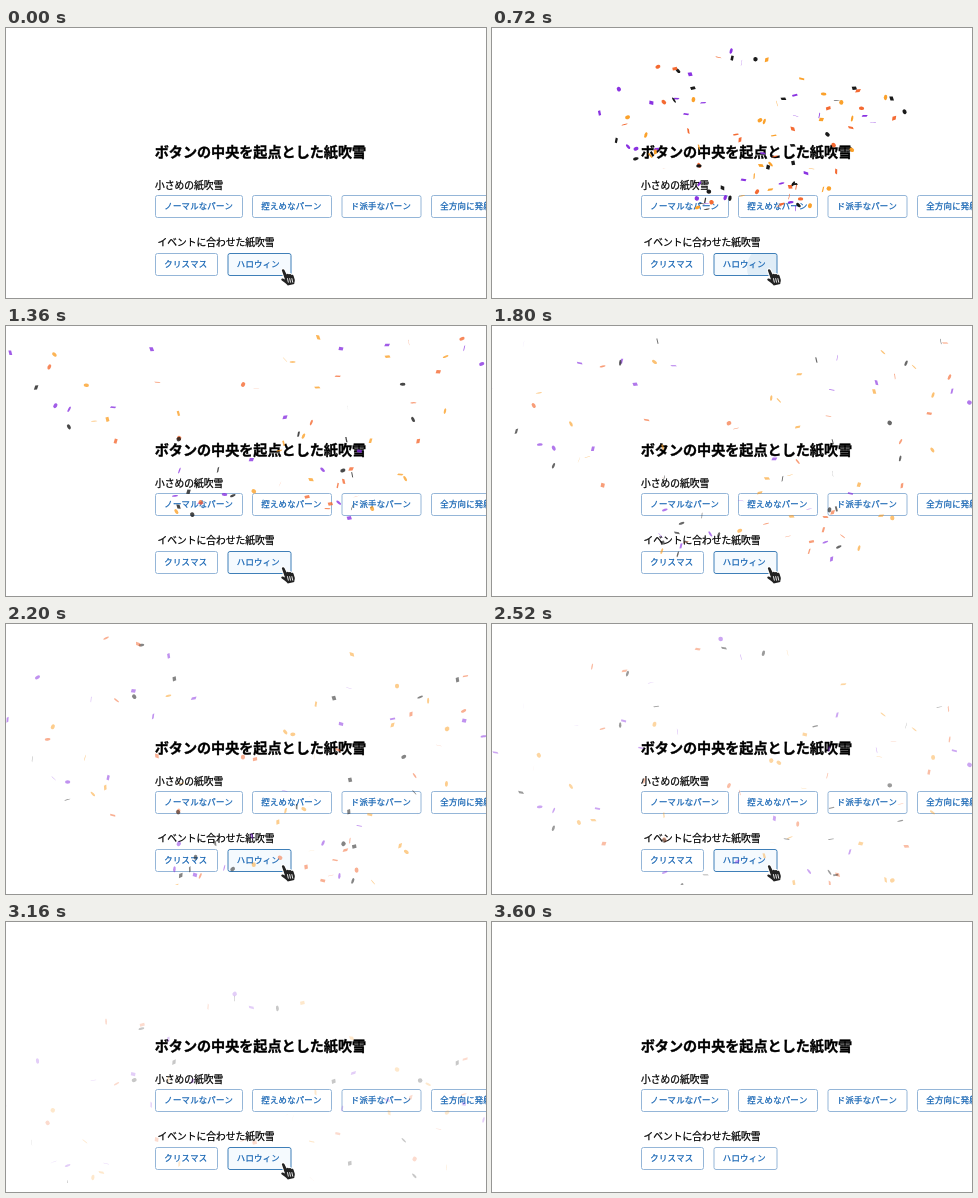
Animation of 480x270 px, one loop 4080 ms. Source, as an HTML page with a canvas:

```html
<!DOCTYPE html>
<html lang="ja">
<head>
<meta charset="utf-8">
<style>
  html, body { margin: 0; height: 100%; overflow: hidden; background: #fff; }
  canvas { display: block; }
</style>
</head>
<body>
<canvas id="stage" width="480" height="270"></canvas>
<script>
const ctx = document.getElementById('stage').getContext('2d');
const LOOP = 4080, STEP = 40, BURST = 560, END = 3600;
const FONT = '"Noto Sans CJK JP", "Noto Sans CJK", sans-serif';
const BLUE = '#1564b3';
const COLORS = ['#fb9d22', '#f4642a', '#852be0', '#111111'];

// Confetti physics per 60 Hz tick, in stage pixels.
const ORIGIN = { x: 253, y: 236 };
const COUNT = 110, SPEED = 27, SPREAD = Math.PI / 2;
const DECAY = 0.9, FALL = 1.5, LIFE = 200, DELAY = 27;

const random = (i, k) => {
  const v = Math.sin(i * 12.9898 + k * 78.233) * 43758.5453;
  return v - Math.floor(v);
};

const pieces = Array.from({ length: COUNT }, (_, i) => {
  const angle = (random(i, 6) - 0.5) * SPREAD;
  const reach = SPEED * (0.5 + random(i, 7)) / (1 - DECAY);
  return {
    seed: i,
    color: COLORS[i % COLORS.length],
    dx: reach * Math.sin(angle),
    dy: -reach * Math.cos(angle),
    round: random(i, 1) < 0.5,
    wobble: random(i, 2) * 10,
    wobbleSpeed: Math.min(0.11, random(i, 3) * 0.1 + 0.05),
    tilt: (random(i, 4) * 0.5 + 0.25) * Math.PI
  };
});

function drawPiece(p, n) {
  const reached = 1 - DECAY ** n;
  const x = ORIGIN.x + p.dx * reached, y = ORIGIN.y + p.dy * reached + FALL * n;
  const wobble = p.wobble + p.wobbleSpeed * n, tilt = p.tilt + 0.1 * n;
  const size = (2 + random(p.seed, n + 8)) / 2;
  const tx = size * Math.cos(tilt), ty = size * Math.sin(tilt);
  const wx = 5.3 * Math.cos(wobble), wy = 5.3 * Math.sin(wobble);
  ctx.fillStyle = p.color;
  ctx.beginPath();
  if (p.round) {
    ctx.ellipse(x, y, Math.abs(wx) * 0.6, Math.abs(wy) * 0.6, Math.PI / 10 * wobble, 0, 7);
  } else {
    ctx.moveTo(x, y);
    ctx.lineTo(x + wx, y + ty);
    ctx.lineTo(x + wx + tx, y + wy + ty);
    ctx.lineTo(x + tx, y + wy);
  }
  ctx.fill();
}

function drawConfetti(age) {
  const n = Math.round((age - DELAY) * 0.06);
  if (n <= 0) return;
  ctx.save();
  ctx.beginPath();
  ctx.rect(0, 9, 480, 252);
  ctx.clip();
  ctx.globalAlpha = Math.max(0, 1 - n / LIFE);
  pieces.forEach(p => drawPiece(p, n));
  ctx.restore();
}

// A thin stroke gives the glyphs a medium weight.
function text(str, x, y, size, { weight = 400, color = '#000', spacing = 0, bolden = 0.25 } = {}) {
  ctx.font = `${weight} ${size}px ${FONT}`;
  ctx.letterSpacing = spacing + 'px';
  ctx.fillStyle = ctx.strokeStyle = color;
  ctx.lineWidth = bolden;
  ctx.fillText(str, x, y);
  ctx.strokeText(str, x, y);
}

function button(label, x, y, w, hover, age = -1) {
  ctx.beginPath();
  ctx.roundRect(x + 0.5, y + 0.5, w - 1, 22, 2);
  ctx.fillStyle = hover ? '#f5fafe' : '#fff';
  ctx.fill();
  if (age >= 0 && age < 550) {
    const ripple = new Path2D();
    ripple.arc(279, 240, age * 0.15, 0, 7);
    ctx.save();
    ctx.clip();
    ctx.globalAlpha = 0.09 * Math.min(1, (550 - age) / 250);
    ctx.fillStyle = BLUE;
    ctx.fill(ripple);
    ctx.restore();
  }
  ctx.strokeStyle = hover ? '#3f7fb8' : '#95b6d8';
  ctx.lineWidth = 1;
  ctx.stroke();
  text(label, x + 9.3, y + 14.2, 8.4, { color: BLUE, spacing: 0.24 });
}

const hand = new Path2D('M0.3 1.6C0 0.2 2 -0.5 2.8 0.9L5 5.4C5.6 4.4 7 4.7 7.4 5.6' +
  'C8.2 4.7 9.4 5.1 9.8 6C10.8 5.4 11.8 6 12.1 7.2L13.1 10.6C13.5 12.2 12.7 13.2 12.6 15' +
  'L6.2 16.6C5 14.6 2.6 13.6 0.2 11.6C-1.2 10.2 0.4 9 1.8 9.8L3.4 10.6Z');

function drawCursor() {
  ctx.save();
  ctx.translate(275.6, 241);
  ctx.lineJoin = 'round';
  ctx.strokeStyle = '#fff';
  ctx.lineWidth = 2;
  ctx.stroke(hand);
  ctx.fillStyle = '#222';
  ctx.fill(hand);
  ctx.lineWidth = 0.9;
  ctx.beginPath();
  for (const x of [5.8, 8, 10.2]) {
    ctx.moveTo(x, 9.2);
    ctx.lineTo(x + 1, 13.6);
  }
  ctx.stroke();
  ctx.restore();
}

function draw(time) {
  const t = Math.floor(time % LOOP / STEP) * STEP;
  const active = t < END, age = t - BURST;
  ctx.fillStyle = '#fff';
  ctx.fillRect(0, 0, 480, 270);
  text('ボタンの中央を起点とした紙吹雪', 148.7, 129.3, 14.1, { weight: 700, bolden: 0.35 });
  text('小さめの紙吹雪', 149, 160.5, 9.75);
  button('ノーマルなパーン', 149, 167, 88);
  button('控えめなパーン', 246, 167, 80);
  button('ド派手なパーン', 335.5, 167, 80);
  button('全方向に発射', 425, 167, 72);
  text('イベントに合わせた紙吹雪', 151.5, 218.2, 9.75);
  button('クリスマス', 149, 225, 63);
  button('ハロウィン', 221.5, 225, 64, active, active ? age : -1);
  if (active) {
    drawConfetti(age);
    drawCursor();
  }
}

const start = performance.now();
(function tick() {
  draw(performance.now() - start);
  requestAnimationFrame(tick);
})();
</script>
</body>
</html>
```
